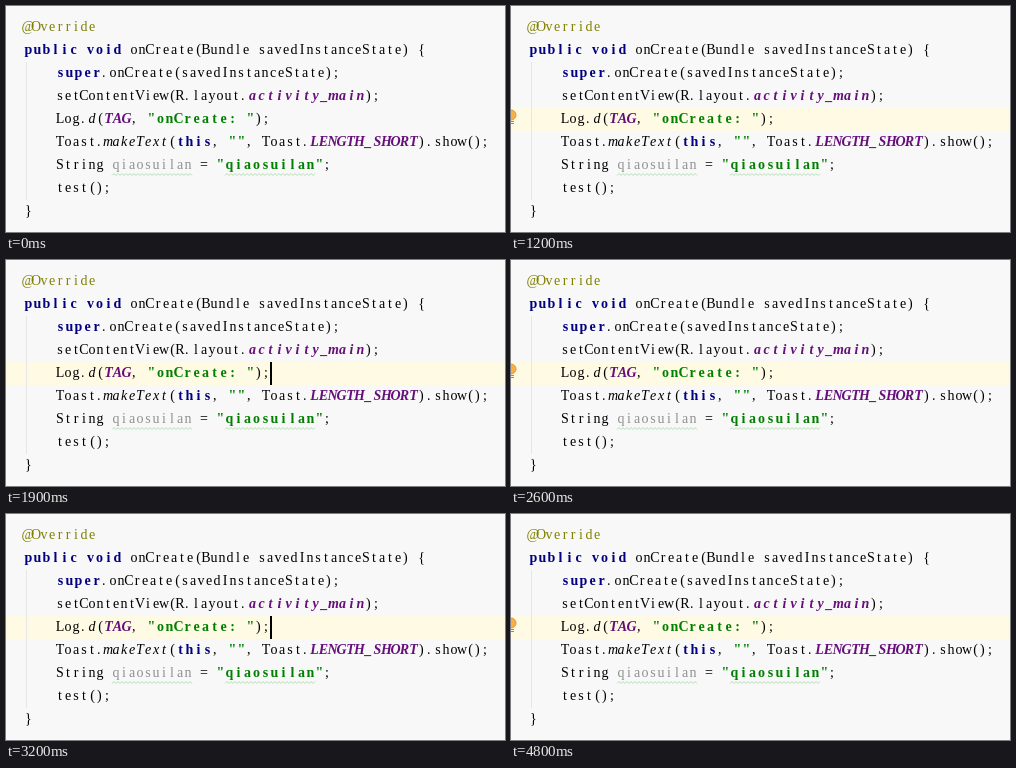
These frames come from a looping animation (499 px wide and 226 px high, 4.9 s). An HTML page with a canvas:

```html
<!DOCTYPE html>
<html lang="en">
<head>
<meta charset="utf-8">
<title>Code folding</title>
<style>
  html, body { margin: 0; width: 100%; height: 100%; overflow: hidden; background: #f8f8f8; }
  canvas { display: block; }
</style>
</head>
<body>
<canvas id="stage" width="499" height="226"></canvas>
<script>
const LOOP = 4900, LEFT = 18, PITCH = 23, ROW = 102;
const FAMILY = '14px "Liberation Serif", "Noto Serif", serif';
const ctx = document.getElementById('stage').getContext('2d');

const head = `@Override
public void onCreate(Bundle savedInstanceState) `;
const code = head + `{
    super.onCreate(savedInstanceState);
    setContentView(R.layout.activity_main);
    Log.d(TAG, "onCreate: ");
    Toast.makeText(this, "", Toast.LENGTH_SHORT).show();
    String qiaosuilan = "qiaosuilan";
    test();
}`;

const token = /(?<note>@\w+)|(?<str>".*?")|(?<key>\b(?:public|void|super|this)\b)|(?<field>activity_main|TAG|LENGTH_SHORT)|(?<call>\bd\b|makeText)|(?<unused>qiaosuilan)|(?<plain>.)/g;
const styles = {
  note: ['#808000', ''],
  str: ['#008000', 'bold'],
  key: ['#000080', 'bold'],
  field: ['#660e7a', 'italic bold'],
  call: ['#000', 'italic'],
  unused: ['#909090', ''],
  plain: ['#000', ''],
  fold: ['#6f7f6f', '']
};

// Each character sits in its own cell; brackets and stops hug one side.
function drawRun(text, x, y, style) {
  const [color, face] = styles[style];
  const cell = face.includes('bold') ? 9 : 8;
  ctx.fillStyle = color;
  ctx.font = `${face} ${FAMILY}`;
  for (const ch of text) {
    const side = '.,;)}'.includes(ch) ? 0 : '({'.includes(ch) ? 1 : 0.5;
    ctx.textAlign = ['left', 'center', 'right'][side * 2];
    ctx.fillText(ch, x + 1 + side * (cell - 2), y);
    x += cell;
  }
  return x;
}

function drawCode(text, top) {
  text.split('\n').forEach((line, i) => {
    let x = LEFT;
    for (const { 0: run, groups } of line.matchAll(token)) {
      const style = Object.keys(groups).find(name => groups[name] !== undefined);
      x = drawRun(run, x, top + 15 + i * PITCH, style);
    }
  });
}

function box(x, y, w, h, color) {
  ctx.fillStyle = color;
  ctx.fillRect(x, y, w, h);
}

function wave(x, width) {
  ctx.strokeStyle = '#b5dfb5';
  ctx.beginPath();
  for (let dx = 0; dx <= width; dx += 2) ctx.lineTo(x + dx, dx % 4 ? 167.5 : 169.5);
  ctx.stroke();
}

function drawBulb() {
  ctx.fillStyle = '#f5b04c';
  ctx.strokeStyle = '#e39a35';
  ctx.beginPath();
  ctx.arc(0, 109, 5, 0, 2 * Math.PI);
  ctx.fill();
  ctx.stroke();
  box(0, 115, 3, 1, '#8c8c8c');
  box(0, 117, 3, 1, '#8c8c8c');
}

const within = (t, ...spans) => spans.some(([from, to]) => t >= from && t < to);

function draw(t) {
  const folded = within(t, [1300, 1900], [2700, 3200]);
  const bulb = within(t, [1200, 1300], [2600, 2700], [4000, LOOP]);
  const caret = t >= 400 && (!bulb || within(t, [4500, 4800]));
  box(0, 0, 499, 226, '#f8f8f8');
  if (t >= 400) box(0, ROW, 499, PITCH, '#fffae3');
  if (folded) {
    box(414, ROW, 44, PITCH, '#e9f5e6');
    drawCode(head, ROW - PITCH);
    drawRun('{...}', 414, ROW + 15, 'fold');
  } else {
    box(20, 56, 1, 138, '#e6e6e6');
    drawCode(code, 10);
    wave(106, 80);
    wave(219, 90);
  }
  if (bulb) drawBulb();
  if (caret) box(folded ? 411 : 264, ROW, 2, PITCH, '#000');
}

const start = performance.now();
function tick() {
  draw((performance.now() - start) % LOOP);
  requestAnimationFrame(tick);
}
tick();
</script>
</body>
</html>
```
